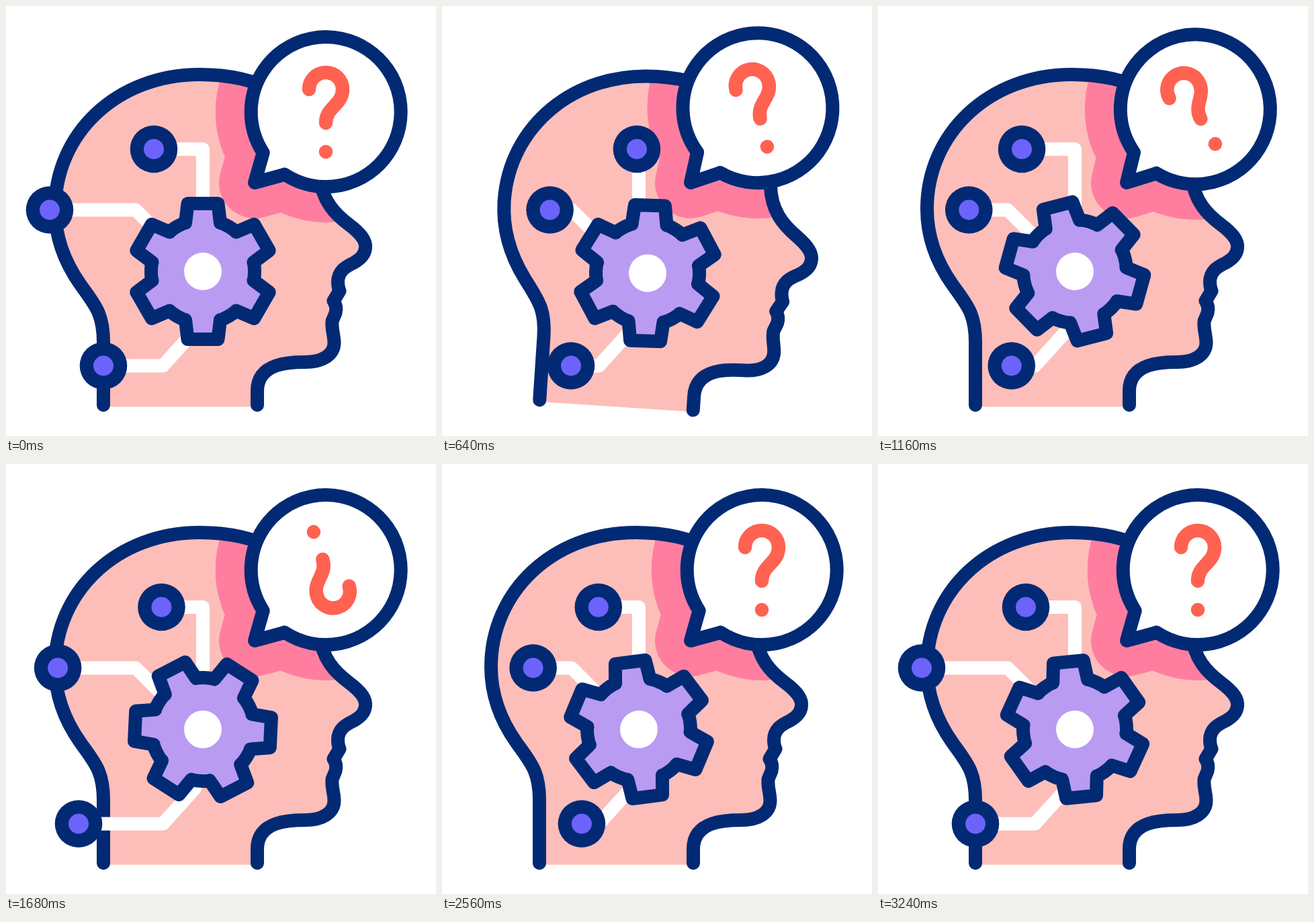
An HTML page with a canvas for the animation above (3280 ms loop, 640 by 640 pixels).

```html
<!DOCTYPE html>
<html lang="en">
<head>
<meta charset="utf-8">
<title>Thinking head</title>
<style>
  html, body { margin: 0; width: 100%; height: 100%; overflow: hidden; background: #fff; }
  canvas { display: block; width: 640px; height: 640px; }
</style>
</head>
<body>
<canvas id="stage" width="640" height="640"></canvas>
<script>
const ctx = document.getElementById('stage').getContext('2d');
const LOOP = 3280, STEP = 40, RAD = Math.PI / 180;
const NAVY = '#022a74', SKIN = '#fdbeb9', ROSE = '#ff7ea0', LILAC = '#ba9bf2',
      VIOLET = '#6c63fb', RED = '#ff6251', WHITE = '#fff';

// Each track is a list of [time, value] joined by a smooth ease.
const tilt = [[0, 0], [590, 4.2], [880, -1.2], [1160, 0]];
const sway = [[0, 0], [600, -3.8], [880, 5.4], [1150, -2.1], [1400, 2.8], [1660, 0]];
const spin = [[270, 0], [1160, -28], [2215, 360]];
const GEAR_SPEED = 1 / 11; // degrees per ms

const nodes = [
  { y: 213, line: [[293, 213], [293, 330]],
    x: [[0, 220], [730, 293], [1335, 194], [2160, 293], [2705, 220]] },
  { y: 303.5, line: [[193, 303.5], [245, 355.5]],
    x: [[150, 65], [880, 193], [1500, 58], [2260, 193], [2290, 193], [2870, 65]] },
  { y: 535.5, line: [[233.5, 535.5], [281, 483]],
    x: [[278, 145], [965, 232], [1560, 100], [2360, 232], [2937, 145]] }
];

const outline = 'M145 594V500C145 458 133 446 111 415C89 384 73 345 73 302' +
  'C73 190 165 102 288 102C330 102 372 110 400 128C445 155 464 215 467 253' +
  'C470 290 490 310 510 325C530 340 536 350 535 360C534 370 528 376 518 382' +
  'C505 388 494 395 494 411Q494 418 496.5 424L487.5 439Q493 447 490.5 457L485.5 469' +
  'C484.5 482 488 488 488.5 500C489 520 470 530 445 530C425 530 374 530 374 573V594';
const headLine = new Path2D(outline);
const headFill = new Path2D(outline + 'V596.5H145Z');

const HUB = [293, 395], NECK = [259.5, 594], TIP = [370, 263], BALLOON = [476.2, 157.6];

const balloon = new Path2D();
balloon.moveTo(...TIP);
balloon.lineTo(414, 251);
balloon.arc(...BALLOON, 111.5, 123.6 * RAD, 147 * RAD, true);
balloon.closePath();

const hook = new Path2D('M451 124A25 25 0 0 1 501 124C501 148 476 150 476 174');

const gear = new Path2D();
for (let i = 0; i < 6; i++) {
  const a = i * 60 * RAD, c = Math.cos(a), s = Math.sin(a);
  for (const [x, y] of [[-26, -72], [-22.5, -101], [22.5, -101], [26, -72]]) {
    gear.lineTo(x * c - y * s, x * s + y * c);
  }
  gear.arc(0, 0, 77, a - 70 * RAD, a - 50 * RAD);
}
gear.closePath();

function at(track, t) {
  if (t <= track[0][0]) return track[0][1];
  for (let i = 1; i < track.length; i++) {
    const [t0, a] = track[i - 1], [t1, b] = track[i];
    if (t < t1) {
      const p = (t - t0) / (t1 - t0);
      return a + (b - a) * p * p * (3 - 2 * p);
    }
  }
  return track[track.length - 1][1];
}

function turn([x, y], deg) {
  ctx.translate(x, y);
  ctx.rotate(deg * RAD);
  ctx.translate(-x, -y);
}

function fill(path, color) {
  ctx.fillStyle = color;
  ctx.fill(path);
}

function stroke(path, color, width = 20) {
  ctx.strokeStyle = color;
  ctx.lineWidth = width;
  ctx.stroke(path);
}

function disc(x, y, r, color) {
  const p = new Path2D();
  p.arc(x, y, r, 0, 7);
  fill(p, color);
}

function group(draw) {
  ctx.save();
  draw();
  ctx.restore();
}

function render(t) {
  const lean = at(tilt, t), swing = at(sway, t);
  ctx.fillStyle = WHITE;
  ctx.fillRect(0, 0, 640, 640);
  ctx.lineCap = ctx.lineJoin = 'round';

  group(() => {
    turn(NECK, lean);
    fill(headFill, SKIN);
    ctx.clip(headFill);
    turn(NECK, -lean);
    turn(TIP, swing);
    stroke(balloon, ROSE, 106);
  });

  group(() => {
    turn(NECK, lean);
    stroke(headLine, NAVY);
  });

  for (const n of nodes) {
    const x = at(n.x, t), wire = new Path2D();
    wire.moveTo(x, n.y);
    for (const p of n.line) wire.lineTo(...p);
    stroke(wire, WHITE);
    disc(x, n.y, 35.3, NAVY);
    disc(x, n.y, 15, VIOLET);
  }

  group(() => {
    turn(NECK, lean);
    ctx.translate(...HUB);
    ctx.rotate(t * GEAR_SPEED * RAD);
    fill(gear, LILAC);
    stroke(gear, NAVY);
    disc(0, 0, 28, WHITE);
  });

  group(() => {
    turn(TIP, swing);
    fill(balloon, WHITE);
    stroke(balloon, NAVY);
    turn(BALLOON, at(spin, t));
    stroke(hook, RED, 20.5);
    disc(476, 217, 10.3, RED);
  });
}

function tick() {
  const t = performance.now() % LOOP;
  render(Math.floor(t / STEP) * STEP);
  requestAnimationFrame(tick);
}
tick();
</script>
</body>
</html>
```
